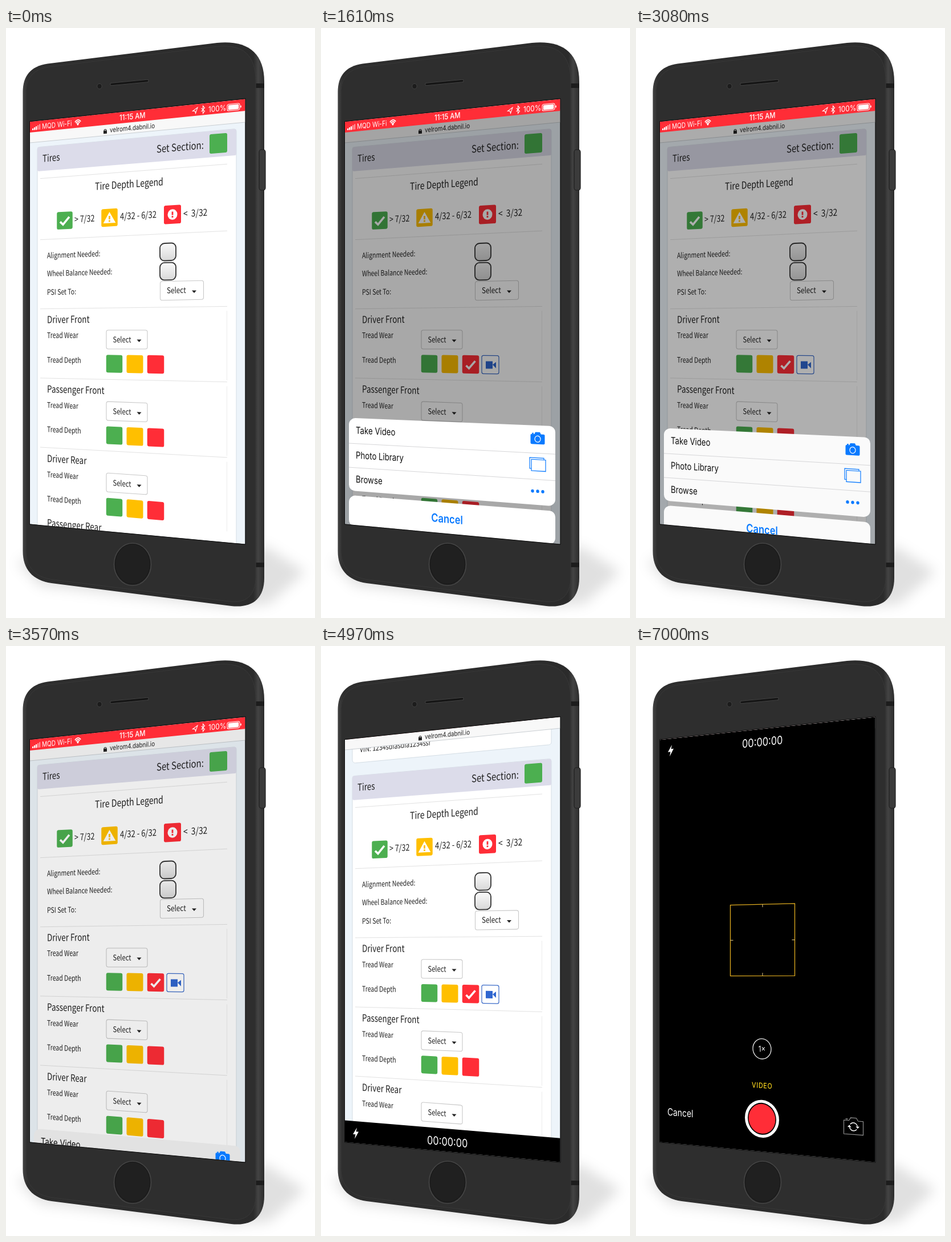
Recreate the animation shown at these times as an HTML page with a canvas. Size 542x1033 px, loop 7.03 s.

```html
<!DOCTYPE html>
<html lang="en">
<head>
<meta charset="utf-8">
<title>Phone inspection form</title>
<style>
html, body { margin: 0; width: 100%; height: 100%; overflow: hidden; background: #fff; }
canvas { display: block; width: 542px; height: 1033px; }
</style>
</head>
<body>
<canvas id="stage"></canvas>
<script>
const canvas = document.getElementById('stage');
const ctx = canvas.getContext('2d');
const W = 542, H = 1033, LOOP = 7030, STEP = 70;
const dpr = window.devicePixelRatio || 1;
canvas.width = W * dpr;
canvas.height = H * dpr;

const PAGE = '"Noto Sans CJK SC", "Noto Sans CJK JP", "Noto Sans CJK", "Noto Sans", sans-serif';
const SYSTEM = 'Inter, Roboto, sans-serif';
const GREEN = '#4caf50', YELLOW = '#ffbf00', RED = '#ff2d37', BLUE = '#0a7aff', INK = '#222';

// Perspective: heights grow to the right around a fixed horizon.
const HORIZON = 539, GROW = 0.000282;
const LEFT = 42, RIGHT = 419.5, TOP = 164.3, BOTTOM = 868.5;
const depth = x => 1 + (x - LEFT) * GROW;
const project = (x, y) => [x, HORIZON + depth(x) * (y + shift - HORIZON)];
let shift = 0;

const clamp = v => Math.max(0, Math.min(1, v));
const smooth = v => { v = clamp(v); return v * v * (3 - 2 * v); };
const spring = ms => { const x = Math.max(0, ms) * 0.00485; return 1 - (1 + x) * Math.exp(-x); };

// Runs draw() at a screen point, sheared to the local slope.
function place(x, y, draw) {
  const k = depth(x), py = y + shift * k;
  ctx.save();
  ctx.transform(1, GROW * (py - HORIZON) / k, 0, 1, x, py);
  draw(k);
  ctx.restore();
}

function text(str, x, y, size, { font = PAGE, color = INK, weight = 400, align = 'left', spacing = 0 } = {}) {
  place(x, y, k => {
    ctx.scale(0.78 * k * k, k);
    ctx.font = `${weight} ${size}px ${font}`;
    ctx.letterSpacing = spacing + 'px';
    ctx.textAlign = align;
    ctx.fillStyle = color;
    ctx.fillText(str, 0, size * 0.36);
  });
}

function paint(fill, stroke, width = 1) {
  if (fill) { ctx.fillStyle = fill; ctx.fill(); }
  if (stroke) { ctx.strokeStyle = stroke; ctx.lineWidth = width; ctx.stroke(); }
}

function path(points, closed = true) {
  ctx.beginPath();
  points.forEach(([x, y], i) => i ? ctx.lineTo(x, y) : ctx.moveTo(x, y));
  if (closed) ctx.closePath();
}

// Rounded panel given on the flat plane.
function panel(x0, x1, y0, y1, r, fill, stroke) {
  const c = [project(x0, y0), project(x1, y0), project(x1, y1), project(x0, y1)];
  ctx.beginPath();
  ctx.moveTo((c[0][0] + c[1][0]) / 2, (c[0][1] + c[1][1]) / 2);
  for (let i = 1; i <= 4; i++) ctx.arcTo(...c[i % 4], ...c[(i + 1) % 4], r);
  ctx.closePath();
  paint(fill, stroke);
}

function rule(x0, x1, y, color) {
  path([project(x0, y), project(x1, y)], false);
  paint(null, color);
}

function box(x, y, w, h, r, fill, stroke, width, extra) {
  place(x, y, () => {
    ctx.beginPath();
    ctx.roundRect(-w / 2, -h / 2, w, h, r);
    paint(fill, stroke, width);
    if (extra) extra();
  });
}

function disc(x, y, rx, ry, fill, stroke, width) {
  ctx.beginPath();
  ctx.ellipse(x, y, rx, ry, 0, 0, Math.PI * 2);
  paint(fill, stroke, width);
}

function checkMark() {
  path([[-8, 2], [-3, 7], [8, -6]], false);
  paint(null, '#fff', 3.6);
}

function exclamation(color, y) {
  ctx.fillStyle = color;
  ctx.fillRect(-1.4, y - 5, 2.8, 6);
  ctx.fillRect(-1.4, y + 2.5, 2.8, 2.8);
}

function warning() {
  path([[0, -9], [10, 9], [-10, 9]]);
  paint('#fff', '#fff', 1);
  exclamation(YELLOW, 2);
}

function alertDot() {
  disc(0, 0, 8.5, 9.2, '#fff');
  exclamation(RED, 0);
}

function videoIcon() {
  ctx.fillStyle = '#2f66d0';
  ctx.fillRect(-8, -6, 12, 13);
  path([[4, 0], [10, -5], [10, 6]]);
  paint('#2f66d0');
}

function select(x, y, w) {
  box(x, y, w, 33, 3.5, '#fff', '#c8c8c8', 1.1);
  text('Select', x - w / 2 + 11.5, y, 13.2);
  place(x + 21.5, y + 2, () => {
    path([[-4, -2], [4, -2], [0, 2.5]]);
    paint('#222');
  });
}

function checkbox(x, y) {
  const g = ctx.createLinearGradient(0, -15, 0, 15);
  g.addColorStop(0, '#fafafa');
  g.addColorStop(1, '#d8d8d8');
  box(x, y, 28, 30.5, 8, g, '#333', 1.8);
}

function wheelSection(title, marked) {
  rule(60, 388, 492, '#e2e2e2');
  path([project(387.5, 499), project(387.5, 610)], false);
  paint(null, '#ececec');
  text(title, 72, 510.5, 17);
  text('Tread Wear', 72, 538.5, 13.2);
  select(212, 545.5, 72);
  text('Tread Depth', 72, 581, 13.2);
  box(190, 588, 28.5, 31, 3, GREEN);
  box(226, 588.5, 29, 31.5, 3, YELLOW);
  box(262.5, 589, 29.5, 32, 3, RED, null, 1, marked && checkMark);
  if (marked) box(297, 589.5, 30, 32, 3, '#fff', '#3a6ac8', 1.2, videoIcon);
}

function drawForm(scroll, marked) {
  shift = scroll;
  panel(55, 404, 60, 187.5, 5, '#fff', '#d4dde4');
  text('VIN: 1234sdfasdfa1234ssf', 68, 162, 13.4);
  panel(55, 404, 210, 1000, 4, '#fff', '#d4dde4');
  panel(55, 404, 210, 252, 3, '#dcdcea');
  text('Tires', 64, 228.5, 17);
  text('Set Section:', 264, 212, 17);
  box(372.5, 202, 31, 34, 3, GREEN);

  rule(60, 388, 265, '#e2e2e2');
  text('Tire Depth Legend', 156, 277.5, 17);
  box(103, 337, 27.5, 30.5, 3, GREEN, null, 1, checkMark);
  text('> 7/32', 120, 335, 15.3);
  box(181.5, 332, 28.5, 31, 3, YELLOW, null, 1, warning);
  text('4/32 - 6/32', 200, 330, 15.3);
  box(292, 326.5, 30, 32.5, 3, RED, null, 1, alertDot);
  text('<  3/32', 311, 325, 15.3);
  rule(60, 388, 371.5, '#e2e2e2');

  text('Alignment Needed:', 72, 398.5, 13.2);
  text('Wheel Balance Needed:', 72, 430, 13.2);
  text('PSI Set To:', 72, 462.5, 13.2);
  checkbox(284, 392);
  checkbox(284, 426);
  select(308.5, 459.5, 76);

  text('Passenger Rear', 72, 866, 17);
  ['Driver Front', 'Passenger Front', 'Driver Rear'].forEach((title, i) => {
    shift = scroll + i * 120.5;
    wheelSection(title, marked && i === 0);
  });
  shift = 0;
}

function drawUrlBar(up) {
  shift = -up;
  panel(LEFT - 2, RIGHT + 2, 181, 201, 0, '#f8f8f8');
  rule(LEFT, RIGHT, 201, '#c9ced2');
  place(174, 180.5, () => {
    ctx.fillStyle = '#222';
    ctx.fillRect(-3, -1, 6, 5.5);
    ctx.beginPath();
    ctx.arc(0, -1, 2, Math.PI, 0);
    paint(null, '#222', 1.1);
  });
  text('velrom4.dabnil.io', 182, 178.5, 11.6, { font: SYSTEM });
  shift = 0;
}

function drawStatusBar(up) {
  const style = { font: SYSTEM, color: '#fff' };
  shift = -up;
  panel(LEFT - 2, RIGHT + 2, 150, 183, 0, RED);
  place(46, 179, () => {
    for (let i = 0; i < 5; i++) {
      ctx.fillStyle = i < 3 ? '#fff' : 'rgba(255,255,255,.5)';
      ctx.fillRect(i * 3, -3 - i * 1.6, 2.2, 3 + i * 1.6);
    }
  });
  text('MQD Wi-Fi', 63, 172, 12.8, style);
  place(126, 169, () => {
    for (const r of [3, 6, 9]) {
      ctx.beginPath();
      ctx.ellipse(0, 1, r * 0.72, r, 0, Math.PI * 1.22, Math.PI * 1.78);
      paint(null, '#fff', 1.8);
    }
    disc(0, 0, 1.3, 1.5, '#fff');
  });
  text('11:15 AM', 199, 157, 13.3, { ...style, weight: 500 });
  place(332, 144.5, () => {
    path([[-4.5, 0.5], [4, -5], [0.5, 5], [-0.5, 1]]);
    paint(null, '#fff', 1.1);
  });
  place(345.5, 143, () => {
    path([[-3, -3], [3, 3], [0, 6.5], [0, -6.5], [3, -3], [-3, 3]], false);
    paint(null, '#fff', 1.1);
  });
  text('100%', 355, 142.5, 12.8, style);
  box(399, 138.5, 22, 11.5, 3, null, '#fff', 1);
  box(399, 138.5, 18.5, 8.5, 1.5, '#fff');
  box(412, 137.5, 1.6, 4, 0.8, '#fff');
  shift = 0;
}

function drawSheet(offset, shade) {
  const tone = `rgb(${shade},${shade},${shade})`;
  const style = { font: SYSTEM, color: '#111' };
  shift = offset;
  panel(49, 411, 671.7, 798.5, 11, tone);
  panel(49, 411, 806.5, 860, 11, tone);
  rule(49, 411, 716, '#d6d6d8');
  rule(49, 411, 758, '#d6d6d8');
  text('Take Video', 61, 693.5, 16.8, style);
  text('Photo Library', 61, 737, 16.8, style);
  text('Browse', 61, 779, 16.8, style);
  text('Cancel', 221, 848, 19.2, { font: SYSTEM, color: BLUE, weight: 600, align: 'center' });
  place(380, 707, () => {
    ctx.beginPath();
    ctx.roundRect(-12.5, -7.5, 25, 17.5, 2);
    paint(BLUE);
    path([[-6, -7], [-4, -11], [4, -11], [6, -7]]);
    paint(BLUE);
    disc(0, 1, 5, 5.5, BLUE, '#fff', 1.2);
    ctx.fillStyle = BLUE;
    ctx.fillRect(-10, -9.5, 3, 2);
  });
  place(380, 753, () => {
    path([[-11, 7], [-14, 7], [-14, -12], [11, -12], [11, -9]], false);
    paint(null, BLUE, 1.2);
    ctx.strokeRect(-11, -9, 25, 20);
  });
  place(380, 799.5, () => [-9, 0, 9].forEach(x => disc(x, 0, 2.7, 2.9, BLUE)));
  shift = 0;
}

function flipIcon() {
  path([[-17, -9], [-8, -9], [-5, -14], [5, -14], [8, -9], [17, -9], [17, 15], [-17, 15]]);
  paint(null, '#999', 1.1);
  ctx.fillStyle = '#999';
  ctx.fillRect(-14, -12, 4, 1.5);
  ctx.translate(0, 1.5);
  for (let i = 0; i < 2; i++) {
    ctx.rotate(Math.PI);
    ctx.beginPath();
    ctx.arc(0, 0, 7, Math.PI * 1.2, Math.PI * 1.95);
    paint(null, '#fff', 1.5);
    path([[4, -1], [10.5, -1], [7.2, 3]]);
    paint('#fff');
  }
}

function drawCamera(offset, t) {
  shift = offset;
  panel(LEFT - 2, RIGHT + 2, TOP - 0.3, 1000, 0, '#000');
  place(61, 183, () => {
    path([[2, -10], [-5, 2], [-0.5, 2], [-2, 10], [5, -3], [0.5, -3]]);
    paint('#fff');
  });
  text('00:00:00', 186, 171, 19.4, { font: SYSTEM, color: '#fff' });

  const grow = 1 + 0.06 * (1 - smooth((t - 6050) / 800));
  const w = 113 * grow, h = 125 * grow;
  place(222, 514.5, () => {
    path([[-w / 2, -h / 2 + 1], [w / 2, -h / 2 - 1], [w / 2, h / 2 + 0.5], [-w / 2, h / 2]]);
    paint(null, '#e0ac20', 1.3);
    ctx.beginPath();
    for (const d of [-1, 1]) {
      ctx.moveTo(d * w / 2, 0);
      ctx.lineTo(d * (w / 2 - 5), 0);
      ctx.moveTo(0, d * h / 2);
      ctx.lineTo(0, d * (h / 2 - 5));
    }
    paint(null, '#e9cf8a', 1);
  });

  place(221, 705, () => disc(0, 0, 16, 17.7, null, '#e8e8e8', 1.3));
  text('1×', 221, 705, 13.5, { font: SYSTEM, color: '#fff', align: 'center' });
  text('VIDEO', 203, 768, 12.6, { font: SYSTEM, color: '#f2cf1d', weight: 500, spacing: 0.8 });
  text('Cancel', 55, 815, 17.6, { font: SYSTEM, color: '#fff' });
  place(221, 827.5, () => {
    disc(0, 0, 30, 33, '#fff');
    disc(0, 0, 25, 28, '#000');
    disc(0, 0, 23.5, 26, RED);
  });
  place(381.5, 840, flipIcon);
  shift = 0;
}

function drawPhone() {
  ctx.save();
  ctx.filter = 'blur(11px)';
  path([[20, 936], [60, 976], [390, 1014], [462, 1008], [525, 952], [455, 908], [60, 920]]);
  paint('rgba(0,0,0,.12)');
  ctx.restore();

  const side = ctx.createLinearGradient(30, 0, 453, 0);
  side.addColorStop(0, '#414141');
  side.addColorStop(0.02, '#2e2e2e');
  side.addColorStop(0.955, '#2b2b2b');
  side.addColorStop(0.975, '#434343');
  side.addColorStop(1, '#2c2c2c');

  ctx.beginPath();
  ctx.moveTo(29.5, 112);
  ctx.bezierCurveTo(29.5, 84, 43, 67, 73, 62.5);
  ctx.lineTo(370, 26);
  ctx.bezierCurveTo(422, 21, 453, 42, 453, 94);
  ctx.lineTo(453, 963);
  ctx.bezierCurveTo(453, 1000, 431, 1016, 395, 1012);
  ctx.lineTo(80, 972);
  ctx.bezierCurveTo(46, 967, 29.5, 947, 29.5, 916);
  ctx.closePath();
  paint(side);

  ctx.fillStyle = '#1d1d1d';
  ctx.fillRect(438, 97, 15, 8);
  ctx.fillRect(438, 936, 15, 8);

  ctx.beginPath();
  ctx.moveTo(35, 113);
  ctx.bezierCurveTo(35, 88, 48, 72, 75, 68);
  ctx.lineTo(371, 32);
  ctx.bezierCurveTo(417, 28, 438, 48, 438, 94);
  ctx.lineTo(438, 960);
  ctx.bezierCurveTo(438, 995, 420, 1008, 391, 1004);
  ctx.lineTo(83, 966);
  ctx.bezierCurveTo(51, 962, 35, 944, 35, 914);
  ctx.closePath();
  paint('#2e2e2e', '#383838', 1);

  ctx.beginPath();
  ctx.roundRect(444, 213, 11, 71, 4);
  paint('#3b3b3b', '#1f1f1f', 1.2);

  disc(164, 102, 4.2, 4.6, '#1c1c1c', '#414141', 1);
  ctx.lineCap = 'round';
  path([[185, 98.5], [248, 92.5]], false);
  paint(null, '#484848', 5);
  paint(null, '#151515', 3.4);
  ctx.lineCap = 'butt';

  disc(222, 939, 32.5, 37, '#222', '#454545', 1.6);
  disc(222, 938.5, 30.5, 35, '#202020', '#191919', 1);
}

function drawScreen(t) {
  const up = spring(t - 630), down = spring(t - 2950);
  const sheet = up * (1 - down);
  const barUp = 19 * smooth((t - 4690) / 210);

  ctx.save();
  panel(LEFT, RIGHT, TOP, BOTTOM, 0, '#edf4fa');
  ctx.clip();
  drawForm(barUp, t >= 350);
  drawUrlBar(barUp);
  if (sheet > 0.003) {
    panel(LEFT - 2, RIGHT + 2, 182, 880, 0, `rgba(0,0,0,${0.36 * sheet})`);
    drawSheet(215 * (1 - sheet), Math.round(255 - 36 * down));
  }
  drawStatusBar(barUp);
  const camera = spring(t - 4892);
  if (camera > 0) drawCamera(706 * (1 - camera), t);
  ctx.restore();

  panel(LEFT - 0.5, RIGHT + 0.5, TOP - 0.7, BOTTOM + 0.5, 0, null, '#0c0c0c');
}

function frame() {
  const t = Math.floor((performance.now() % LOOP) / STEP) * STEP;
  ctx.setTransform(dpr, 0, 0, dpr, 0, 0);
  ctx.fillStyle = '#fff';
  ctx.fillRect(0, 0, W, H);
  drawPhone();
  drawScreen(t);
  requestAnimationFrame(frame);
}
frame();
</script>
</body>
</html>
```
